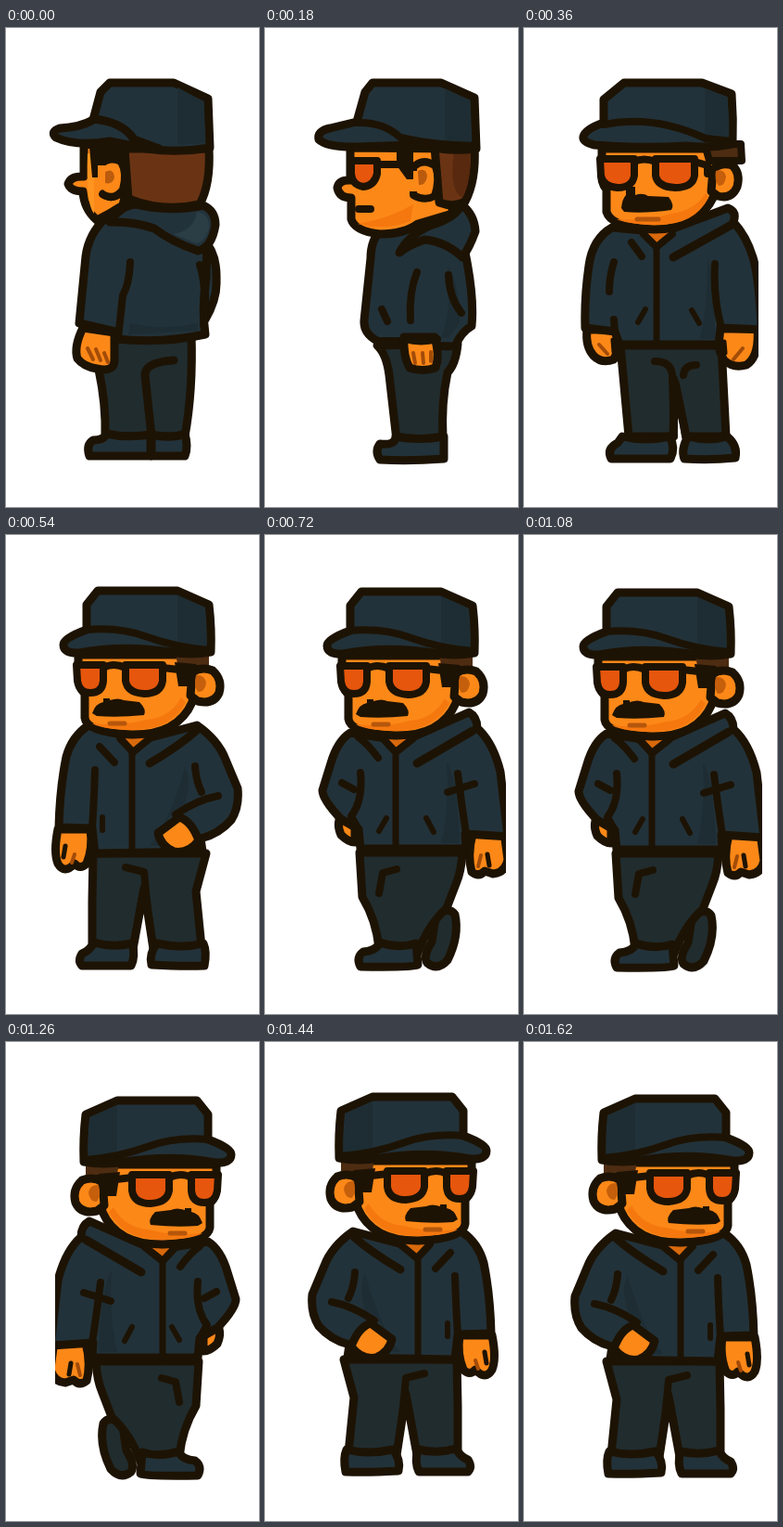
Write an HTML page that moves like this. It is 273 px wide and 516 px high and loops after 1800 ms.

```html
<!DOCTYPE html>
<html lang="en">
<head>
<meta charset="utf-8">
<title>Walking man</title>
<style>
html, body { margin: 0; width: 100%; height: 100%; overflow: hidden; background: #fff; }
svg { display: block; width: 100%; height: 100%; }
</style>
</head>
<body>
<svg id="stage" viewBox="0 0 273 516" stroke-linecap="round" stroke-linejoin="round"></svg>
<script>
const INK = '#1d1304', CLOTH = '#22323a', DARK = '#1e2d33', LEG = '#212c2e',
  SKIN = '#fc8818', SHADE = '#d9690c', HAIR = '#6a3414', LENS = '#e6560d';

const shape = (d, fill, w = 9) =>
  `<path d="${d}" fill="${fill}" stroke="${INK}" stroke-width="${w}"/>`;
const flat = (d, fill) => `<path d="${d}" fill="${fill}"/>`;
const line = (d, w = 8, color = INK) =>
  `<path d="${d}" fill="none" stroke="${color}" stroke-width="${w}"/>`;
const fingers = d => line(d, 4, '#a34c08');

// Head turned three quarters to the left
const walkHead = [
  shape('M83 130V152Q82 164 90 172V198Q92 214 140 216Q190 217 206 181L212 130Z', SKIN),
  flat('M194 176Q182 198 156 200Q132 207 98 204Q110 211 145 211Q184 210 199 181Z', '#f5780f'),
  flat('M188 127H224V141H190Z', '#4d2c12'),
  shape('M206 149Q216 142 228 147Q239 157 235 171Q229 184 212 180L204 174Z', SKIN),
  flat('M210 152Q219 151 221 160Q220 170 212 170Q207 163 210 152Z', '#c55f0c'),
  flat('M187 138L210 140L212 146L205 164H191Z', INK),
  shape('M81 141H110V158Q109 171 96 171Q84 171 82 158Z', LENS, 8),
  shape('M134 141H174V158Q172 172 154 172Q136 171 134 158Z', LENS, 8),
  line('M110 144Q121 138 134 144M174 144L200 147'),
  flat('M98 193Q102 182 110 181V177H117V179Q126 176 132 179L149 181Q157 189 154 195Q126 198 103 196Z', INK),
  line('M117 204H133', 5, '#b5560c'),
  shape('M92 103V76L104 61H190L224 76Q227 102 226 127Q205 131 182 127Q130 119 84 128Q67 129 67 119Q67 112 92 103Z', CLOTH),
  flat('M190 66L219 79Q222 102 221 122Q208 125 190 121Z', DARK),
  line('M92 103Q128 100 158 111Q188 122 224 125')
].join('');

const frontHead = [
  shape('M84 130V152Q82 166 89 174V198Q94 215 140 217Q188 217 205 181L212 130Z', SKIN),
  flat('M196 178Q184 197 158 200Q134 208 100 206Q115 212 145 212Q184 212 199 183Z', '#f5780f'),
  shape('M195 125H234L235 143H200Z', '#4d2c12', 8),
  shape('M204 152Q213 144 225 148Q234 157 230 171Q224 185 209 181L202 176Z', SKIN),
  flat('M207 154Q216 151 218 160Q217 170 210 170Q205 163 207 154Z', '#c55f0c'),
  shape('M82 141H119V159Q117 172 101 172Q85 171 83 159Z', LENS, 8),
  shape('M142 141H184V159Q182 172 163 172Q144 171 142 159Z', LENS, 8),
  line('M119 144Q129 139 142 144M184 144L198 148V157'),
  flat('M105 194Q106 184 110 180V171H120V180Q128 177 134 181L156 182Q163 191 159 196Q130 200 108 198Z', INK),
  line('M122 206H145', 5, '#b5560c'),
  shape('M86 102V77L108 59H192L224 71Q226 98 225 125Q200 130 175 127Q130 130 76 126Q63 123 64 117Q66 109 86 102Z', CLOTH),
  flat('M195 65L219 75Q222 98 221 121L195 122Z', DARK),
  line('M86 104Q140 93 196 119L224 122')
].join('');

// Mid-stride, facing left
const stride = [
  shape('M184 412Q198 398 205 409Q210 432 197 458Q186 470 175 461Q170 454 180 438Z', LEG),
  shape('M102 342H213Q212 362 206 376L196 402Q176 420 165 450L123 445Q120 415 105 390Z', LEG),
  line('M142 360L127 364L123 386'),
  shape('M124 439Q144 446 163 440L165 463Q160 466 103 465Q98 455 106 449Q120 448 124 439Z', CLOTH),
  shape('M84 298Q76 310 82 323Q90 331 97 331V298Z', SKIN),
  shape('M224 322Q218 344 223 363Q231 369 237 362L246 365Q259 364 262 350L258 320Z', SKIN),
  line('M240 344L242 356', 5),
  fingers('M233 345L230 357'),
  shape('M92 213Q78 222 71 246L62 275Q62 285 82 306L101 317L103 338H217L216 322L262 325L254 255Q246 223 229 208Q229 196 220 191L150 222Z', CLOTH),
  flat('M196 244Q207 260 210 332H190Q199 298 196 244Z', DARK),
  flat('M130 216H160L142 232Z', SHADE),
  line('M101 218Q111 225 122 240M128 220L141 234L160 219'),
  line('M164 246L224 211', 9),
  line('M141 235V338', 7),
  line('M103 256Q106 286 93 303L101 317M83 267L96 274M208 257Q212 290 217 322M197 277L226 268'),
  line('M131 305L123 319M174 305L182 320', 6),
  walkHead
].join('');

// Feet together, facing right
const pause = [
  shape('M89 344L100 385L94 445L146 447L156 382L168 447H212L212 395L211 344Z', LEG),
  line('M176 359L156 364Q153 400 147 440M156 380L167 440'),
  shape('M92 441Q115 447 142 441Q151 452 148 464Q115 466 91 465Q88 450 92 441Z', CLOTH),
  shape('M169 441Q190 446 210 440Q215 449 223 452Q228 460 223 465H170Q165 454 169 441Z', CLOTH),
  shape('M214 318Q211 338 218 355Q225 362 231 355Q242 367 249 355Q254 343 249 318Z', SKIN),
  line('M241 336L243 348', 5),
  fingers('M231 345L234 354'),
  shape('M99 206Q76 222 68 243L55 274Q53 294 62 308Q75 323 95 328L93 342L209 344L212 317L248 316Q247 274 240 240Q234 218 216 206L160 222Z', CLOTH),
  flat('M112 252Q104 264 112 290L130 306L134 336H150Q128 310 112 252Z', DARK),
  flat('M153 218H182L169 233Z', SHADE),
  line('M151 221L168 235L182 220M188 246L204 229'),
  line('M150 247Q118 228 100 212', 9),
  line('M169 236V342', 7),
  line('M101 250Q100 266 94 278M76 282Q98 286 122 302M209 254Q210 288 212 317'),
  line('M201 305V319', 6),
  shape('M97 330Q105 309 118 305L130 314L141 322Q138 336 124 342Q108 345 97 330Z', SKIN),
  `<g transform="matrix(-1 0 0 1 310 0)">${walkHead}</g>`
].join('');

const front = [
  shape('M104 342H213L218 440H175L163 382L161 440H113Z', LEG),
  line('M141 359Q160 359 160 376L162 440M162 378Q169 405 174 440M186 363Q173 363 172 374'),
  shape('M106 440Q130 446 157 440Q164 452 158 464H94Q89 453 101 447Z', CLOTH),
  shape('M177 440Q200 446 219 440Q231 450 228 463Q200 466 173 464Q169 454 177 440Z', CLOTH),
  shape('M68 325Q66 343 75 353Q84 362 97 357Q105 342 100 325Z', SKIN),
  line('M96 336L97 349', 5),
  fingers('M81 341L90 351'),
  shape('M211 324Q207 345 216 358Q226 367 240 363Q254 354 252 324Z', SKIN),
  line('M216 338L217 350', 5),
  fingers('M236 345L226 357'),
  shape('M95 215Q74 227 70 256Q65 290 66 323L98 327L103 341H210L212 323L256 325Q254 270 247 247Q240 224 226 209Q230 198 220 194L150 220Z', CLOTH),
  flat('M198 248Q205 270 206 335H190Q199 298 198 248Z', DARK),
  flat('M130 220H160L144 235Z', SHADE),
  line('M129 222L143 236L160 222M116 231L127 246'),
  line('M161 247L224 212', 9),
  line('M143 237V338', 7),
  line('M97 252Q92 268 92 284M98 327L97 314M206 254Q204 290 213 323'),
  line('M131 303L123 317M181 304L189 318', 6),
  frontHead
].join('');

const back = [
  shape('M100 330H200Q202 390 193 440H107Q108 405 100 368Z', LEG),
  line('M181 358Q150 360 150 374L157 440', 9),
  shape('M108 437Q130 442 156 438V461H90Q86 449 94 444Q106 444 108 437Z', CLOTH),
  shape('M157 438Q178 443 193 437Q197 451 193 461H157Z', CLOTH),
  shape('M83 323Q73 343 77 356Q84 365 98 367Q117 371 117 358V328Z', SKIN),
  fingers('M88 345L94 357M97 346L102 358M106 350L110 360'),
  shape('M213 228Q228 242 227 272Q228 292 215 314Z', CLOTH),
  shape('M108 204Q89 222 86 246L79 318L118 327V335Q170 340 215 330Q211 300 216 270L217 222Z', CLOTH),
  flat('M134 318Q170 326 207 318V326L132 330Z', DARK),
  line('M134 252Q133 276 126 288L121 334M209 255Q217 278 213 320'),
  shape('M84 125V160Q70 159 67 168Q70 176 83 176Q84 195 98 207Q112 200 126 191L140 130Z', SKIN),
  flat('M88 135H95V200Q86 190 88 135Z', '#ff951f'),
  shape('M128 130H219Q221 168 209 190Q170 199 132 184Z', HAIR),
  flat('M90 128H132V146H104L102 161H93Z', INK),
  shape('M103 146Q113 138 124 144Q131 156 126 174Q117 187 104 179V146Z', SKIN, 8),
  flat('M99 148H108V178H99Z', SKIN),
  line('M104 178Q112 186 122 180', 7),
  flat('M107 155Q116 150 117 161Q115 169 107 167Z', '#bb5b0d'),
  shape('M112 209Q124 191 140 190Q175 199 213 191Q226 197 226 212Q222 237 207 240Q178 230 160 216Q138 208 112 209Z', CLOTH),
  flat('M206 198Q220 200 219 216Q214 231 205 232L181 222Q203 218 206 198Z', '#2b3d45'),
  shape('M94 99L102 69L112 59H181L218 76L220 129Q185 135 152 130L112 122Q75 128 54 118Q47 112 58 108Q80 107 94 99Z', CLOTH),
  flat('M185 64L213 79L215 124L185 126Z', DARK),
  line('M94 98Q126 101 138 120L165 130', 9)
].join('');

const side = [
  shape('M121 342Q131 351 134 374L142 444L192 442Q190 404 197 371Q206 362 208 340Z', LEG),
  shape('M141 440Q165 445 193 440V464Q155 467 124 465Q118 456 124 448Q141 450 141 440Z', CLOTH),
  shape('M126 216Q114 228 114 248L107 315Q106 329 121 337L124 341L205 343Q212 327 223 321Q226 290 216 242L214 215Z', CLOTH),
  flat('M197 256Q210 275 210 318L198 334H190Q202 305 197 256Z', DARK),
  line('M164 263Q155 285 157 315M198 266Q199 291 212 307M126 303L132 316M122 337H150'),
  shape('M150 333H183Q189 353 184 366Q170 371 156 366Q149 354 150 333Z', SKIN),
  fingers('M160 350L162 361M170 350L171 361M179 349L179 359'),
  shape('M151 335Q168 340 186 335', CLOTH, 8),
  shape('M92 129V164Q80 163 78 172Q80 183 93 183V206Q97 219 124 222Q150 222 165 211L202 200V130Z', SKIN),
  flat('M100 211Q135 205 160 190L157 208Q130 219 100 211Z', '#f5780f'),
  shape('M183 128H226Q228 164 216 187Q204 194 188 188Z', HAIR),
  flat('M204 133H222Q222 168 213 183Q198 175 204 133Z', '#58290f'),
  shape('M160 150Q171 139 184 149Q189 163 183 181Q172 187 160 180Z', SKIN, 8),
  flat('M154 154H165V176H154Z', SKIN),
  flat('M165 154Q174 150 175 160Q173 170 166 169Z', '#b95a0d'),
  flat('M142 128H160V163H153L142 148Z', INK),
  shape('M93 143H121V157Q118 170 106 171Q94 169 93 157Z', LENS, 8),
  line('M121 147H150'),
  line('M101 195H114', 8),
  shape('M145 242Q154 224 178 213Q207 204 212 190Q226 201 227 219Q221 236 213 247Q195 230 172 228Q153 235 145 242Z', CLOTH),
  shape('M99 101L108 69L116 59H190L226 75L228 130Q198 134 166 126Q125 127 101 128Q67 129 58 120Q56 111 70 108Z', CLOTH),
  flat('M194 65L221 78L223 125L194 126Z', DARK),
  line('M99 102Q128 101 146 118Q180 126 227 127')
].join('');

// Each step: artwork, x shift, y shift, mirrored, right edge of the artwork
const STEP = 180;
const steps = [
  [back, 0, 0],
  [side, 0, 0],
  [front, 0, 0, false, 253],
  [pause, -5, -1, true],
  [stride, 0, 0, false, 260],
  [pause, 6, -3, true],
  [stride, -3, 1, false, 260],
  [stride, 0, 2, true, 257],
  [pause, -4, -2],
  [pause, 0, 0]
];

const stage = document.getElementById('stage');
stage.innerHTML = steps.map(([art, x, y, flip, edge = 273], i) => `
  <g display="none" transform="matrix(${flip ? -1 : 1} 0 0 1 ${x + (flip ? 310 : 0)} ${y})">
    <clipPath id="edge${i}"><path d="M-40-10H${edge}V530H-40Z"/></clipPath>
    <g clip-path="url(#edge${i})">${art}</g>
  </g>`).join('');

const poses = [...stage.children];
let shown = -1;

function draw(time) {
  const i = Math.floor(time / STEP) % steps.length;
  if (i !== shown) {
    poses.forEach((pose, k) => pose.setAttribute('display', k === i ? 'inline' : 'none'));
    shown = i;
  }
}

let start;
function tick(now) {
  start ??= now;
  draw(now - start);
  requestAnimationFrame(tick);
}
draw(0);
requestAnimationFrame(tick);
</script>
</body>
</html>
```
